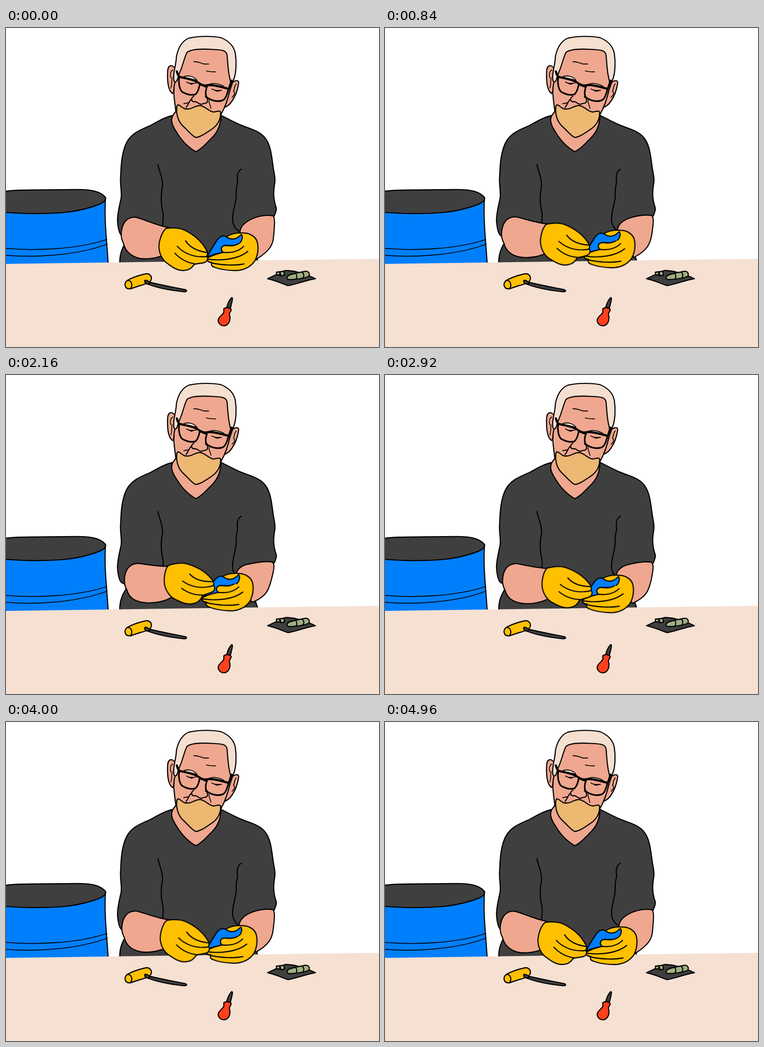
Recreate the animation shown at these times as an HTML page. Size 810 by 691 pixels, loop 5000 ms.

```html
<!DOCTYPE html>
<html lang="en">
<head>
<meta charset="utf-8">
<title>Workbench</title>
<style>
  html, body { margin: 0; width: 100%; height: 100%; overflow: hidden; background: #fff; }
  svg { display: block; width: 100%; height: 100%; }
  path { stroke: #000; stroke-width: 2.4; stroke-linecap: round; stroke-linejoin: round; }
  .line { fill: none; }
  .bare { stroke: none; }
  .skin { fill: #efa78f; }
  .dark { fill: #3f3f3f; }
  .pale { fill: #f4dfd1; }
  .table { fill: #f5e0d2; }
  .beard { fill: #ecb872; }
  .yellow { fill: #ffc000; }
  .blue { fill: #007ffc; }
  .red { fill: #ff401c; }
  .green { fill: #a0b082; }
  .thin path { stroke-width: 1.8; }
  .lens { stroke-width: 3.4; }
  .frame { stroke-width: 4.6; }

  .move { animation: 5s cubic-bezier(.37, 0, .63, 1) infinite; }
  #leftGlove { animation-name: swing; transform-origin: 235px 398px; }
  .rightGlove { animation-name: lift; transform-origin: 492px 485px; }
  #cloth { animation-name: carry; }
  #leftArm { animation-name: leftArm; }
  #rightArm { animation-name: rightArm; }
  #lids { animation: blink 5s linear infinite; }

  /* quick rise, slower return */
  @keyframes swing {
    0%, 100% { transform: rotate(0deg); }
    38% { transform: rotate(-10.9deg); animation-timing-function: cubic-bezier(.31, 0, .6, 1); }
  }
  @keyframes lift {
    0%, 100% { transform: translate(0, 0) rotate(0deg); }
    38% { transform: translate(-11px, -15px) rotate(1.5deg); animation-timing-function: cubic-bezier(.31, 0, .6, 1); }
  }
  @keyframes carry {
    0%, 100% { transform: translate(0, 0); }
    38% { transform: translate(-6px, -15px); animation-timing-function: cubic-bezier(.31, 0, .6, 1); }
  }
  @keyframes leftArm {
    0%, 100% { d: path("M253 430C258 416 268 409 282 410C305 416 325 427 352 432L352 488C332 498 308 502 290 499C268 494 258 480 255 466C249 455 249 442 253 430Z"); }
    38% {
      d: path("M260 428C265 414 274 408 288 408C310 411 330 415 358 414L362 480C345 491 322 495 302 493C280 491 267 482 263 466C256 455 256 440 260 428Z");
      animation-timing-function: cubic-bezier(.31, 0, .6, 1);
    }
  }
  @keyframes rightArm {
    0%, 100% { d: path("M508 441C510 428 520 419 540 411C555 406 570 405 580 407C585 412 583 430 581 452C580 470 572 483 545 500L520 480Z"); }
    38% {
      d: path("M499 435C500 420 512 411 530 409C548 405 565 403 578 405C585 410 581 424 577 440C571 460 570 478 535 492L510 470Z");
      animation-timing-function: cubic-bezier(.31, 0, .6, 1);
    }
  }
  @keyframes blink {
    0%, 9.5%, 14%, 65.5%, 70%, 100% { transform: translateY(0); }
    11.6%, 67.6% { transform: translateY(2px); }
  }
</style>
</head>
<body>
<svg viewBox="0 0 810 691" preserveAspectRatio="none">
  <g id="barrel">
    <path class="blue" d="M-5 375L216 368C213 420 219 460 222 512L-5 515Z"/>
    <path class="dark" d="M-5 354C25 350 60 351 150 350C190 349 207 356 216 367C219 376 205 382 185 388C150 399 115 402 60 402C30 402 10 400 -5 399Z"/>
    <g class="thin">
      <path class="line" d="M-5 477C60 483 155 480 219 458M-5 492C60 498 155 493 220 468"/>
    </g>
  </g>

  <g id="torso">
    <path class="dark" d="M364 189C345 193 330 202 314 211C290 221 272 229 262 248C252 268 250 292 249 320C247 342 252 352 250 368C247 384 243 394 242 416C243 432 246 450 254 451C258 452 262 458 260 464C252 478 246 490 247 515L549 515C546 500 543 494 540 486L560 440L583 406C585 400 588 396 587 390C581 372 580 358 583 340C586 325 582 315 580 300C577 278 575 255 564 240C555 226 537 220 517 213C500 207 484 197 466 189Z"/>
    <path class="line" d="M330 296C333 312 341 325 340 342C336 360 336 380 341 400C342 410 341 418 340 428M511 306C500 312 502 326 503 335C500 345 499 352 500 365C498 385 492 395 492 416C493 430 500 437 508 442"/>
  </g>

  <g id="head">
    <path class="skin" d="M364 187C356 198 360 210 370 225C382 245 398 260 412 268C425 262 436 249 448 237C461 224 467 208 467 186L440 160L385 160Z"/>
    <path class="skin" d="M366 86C360 79 352 80 351 93C350 114 352 136 362 142L370 125Z"/>
    <path class="skin" d="M492 118C500 112 507 113 505 121C503 134 498 148 491 158C486 166 480 170 474 172Z"/>
    <g class="thin">
      <path class="line" d="M362 91C357 94 356 101 358 108M361 108C358 115 362 120 358 130M500 121C494 128 497 132 494 137C499 140 496 146 491 150"/>
    </g>
    <path class="skin bare" d="M370 110L384 50L400 38H475L488 55L490 118C485 145 477 165 465 190L371 190C366 165 365 140 367 116Z"/>
    <path class="line" d="M368 114C361 134 366 155 369 182M486 135C482 155 475 173 467 187"/>
    <path class="pale" d="M365 115C361 100 370 80 370 62C374 42 383 28 397 22C420 17 448 17 467 21C484 28 495 40 498 55C501 75 500 98 494 113C491 121 488 120 487 113C482 96 482 78 480 58C478 47 465 47 440 46C419 45 401 46 393 53C387 64 384 82 377 97C373 105 372 122 365 115Z"/>
    <g class="thin">
      <path class="line" d="M408 73C418 73 424 76 430 78L440 78M435 93C442 95 448 95 455 95"/>
      <path class="pale" d="M385 106C395 101 410 105 415 114C406 110 395 110 385 106Z"/>
      <path class="pale" d="M441 122C451 118 469 121 477 130C465 126 453 124 441 122Z"/>
      <g id="lids">
        <path class="line" d="M392 117C398 121 405 121 413 119M447 132C454 136 461 136 468 135"/>
        <path d="M398 120L408 120L403 122ZM453 135L463 136L458 137Z"/>
      </g>
      <path class="line" d="M441 157C440 164 444 166 445 174M396 162L386 164"/>
    </g>
    <path class="line" d="M408 148C401 151 402 160 409 160C415 157 418 167 425 165C431 162 437 165 438 157C438 153 436 151 433 149M403 154C397 158 397 166 391 172"/>
    <path class="line lens" d="M376 107C374 120 377 132 382 138C392 144 403 146 411 144C417 139 419 130 421 121M437 125C433 137 432 145 437 151C448 158 460 160 470 157C478 153 480 143 483 133"/>
    <path class="line frame" d="M371 94C373 101 374 104 377 106C390 109 406 111 417 118C424 123 430 126 437 124C450 122 468 128 484 132L490 114M421 122C427 123 432 127 436 127"/>
    <path class="beard" d="M371 170C374 161 380 172 388 175C404 178 410 167 422 168C434 170 440 181 451 182C458 181 464 178 466 182C467 198 459 211 447 219C431 230 420 237 412 237C405 235 397 224 385 213C374 203 369 187 371 170Z"/>
  </g>

  <path class="table bare" d="M0 511L810 500V691H0Z"/>

  <g id="hammer">
    <path class="dark" d="M302 548C330 556 362 561 390 567C395 570 391 572 384 571C352 568 325 562 303 553Z"/>
    <path class="yellow" d="M263 547C275 540 288 536 301 533C312 530 318 538 315 546C311 553 300 556 291 558L270 565C258 566 255 554 263 547Z"/>
    <path class="line" d="M263 547C272 546 276 556 271 564"/>
    <path class="dark" d="M301 547C306 545 309 549 313 552C310 556 305 555 302 552Z"/>
  </g>

  <g id="screwdriver">
    <path class="dark" d="M479 607C481 598 484 590 490 584C493 584 492 589 487 608Z"/>
    <path class="red" d="M473 608C479 604 487 606 489 610C490 614 485 615 485 620C489 632 484 643 475 645C465 646 458 637 462 629C466 622 475 618 473 613Z"/>
  </g>

  <g id="tray">
    <path class="dark" d="M568 543L600 528C607 523 614 526 626 527L652 534L672 543C650 547 630 555 613 558C604 556 593 549 568 543Z"/>
    <path class="green" d="M611 539C613 534 623 533 630 531L650 527C657 526 661 533 657 538C648 542 634 544 617 545C611 545 609 543 611 539Z"/>
    <path class="line" d="M629 532C632 535 632 540 630 544M643 529C647 532 648 537 645 541"/>
    <path class="green" d="M587 529L594 528L595 535L588 535ZM595 528L603 527L605 535L597 537Z"/>
  </g>

  <path id="rightArm" class="skin move" d="M508 441C510 428 520 419 540 411C555 406 570 405 580 407C585 412 583 430 581 452C580 470 572 483 545 500L520 480Z"/>
  <path id="leftArm" class="skin move" d="M253 430C258 416 268 409 282 410C305 416 325 427 352 432L352 488C332 498 308 502 290 499C268 494 258 480 255 466C249 455 249 442 253 430Z"/>

  <g class="rightGlove move">
    <path class="yellow" d="M440 497C452 491 462 488 472 486C464 480 468 471 478 471L475 456C484 447 497 443 515 444C530 444 543 452 546 465C549 480 546 494 540 505C532 516 520 523 505 525C485 526 465 523 452 518C446 516 445 512 447 508C437 508 434 500 440 497Z"/>
  </g>
  <path id="cloth" class="blue move" d="M436 496C443 484 450 472 458 460C464 452 470 448 478 452C489 460 500 459 511 447C515 452 513 462 506 467C498 473 488 471 480 471C468 471 464 480 472 486C460 488 448 491 436 496Z"/>
  <g class="rightGlove move">
    <path class="yellow bare" d="M440 497C452 491 462 488 472 486C464 480 468 471 478 471C490 474 500 471 508 466L528 480L515 505L455 508Z"/>
    <path class="line" d="M440 497C452 491 462 488 472 486C464 480 468 471 478 471C490 473 499 471 506 467M472 486C492 488 506 483 516 473M439 501C470 505 506 500 525 484M447 509C470 514 498 515 517 511M440 497C434 500 437 508 447 508"/>
  </g>

  <g id="leftGlove" class="move">
    <path class="yellow" d="M348 434C362 432 378 433 388 438C408 448 425 463 434 479C438 485 439 490 436 494C440 499 437 506 431 508C424 510 415 510 409 512C404 519 398 525 388 525C375 527 362 519 352 511C340 504 333 490 332 474C333 456 340 440 348 434Z"/>
    <path class="line" d="M390 461C399 475 415 483 435 486M372 473C386 488 408 498 436 495M367 488C378 500 392 508 410 511"/>
  </g>
</svg>
</body>
</html>
```
